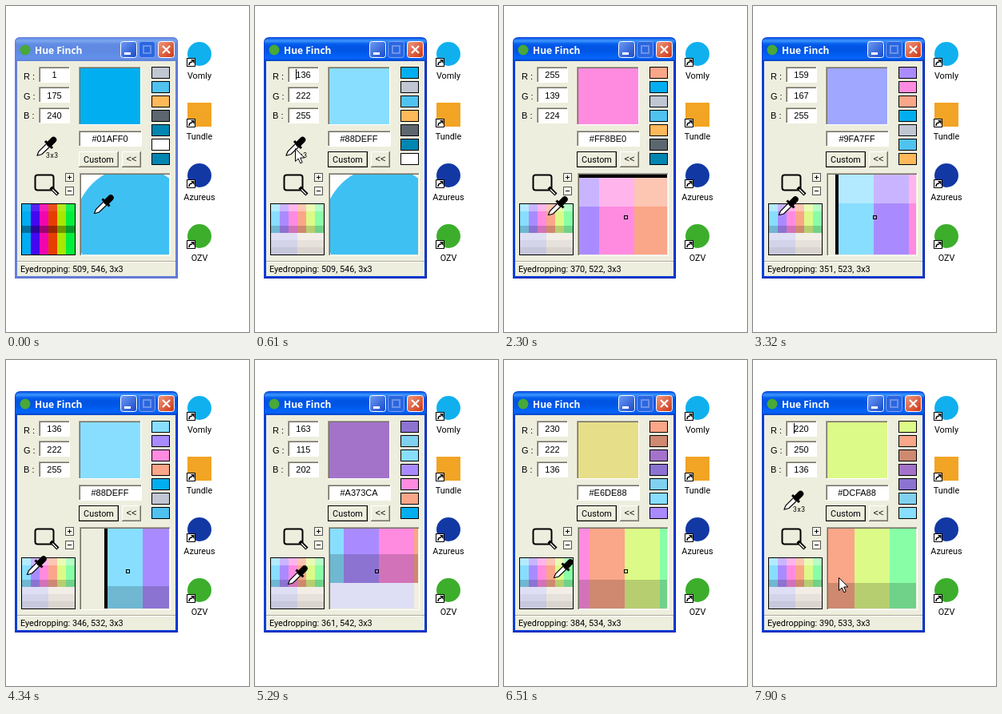
Animation of 304x408 px, one loop 7960 ms. Source, as an HTML page:

```html
<!DOCTYPE html>
<html lang="en">
<head>
<meta charset="utf-8">
<title>Colour picker</title>
<style>
html, body { margin: 0; width: 100%; height: 100%; overflow: hidden; background: #fff; }
svg { display: block; }
text { font: 10.85px Roboto, sans-serif; fill: #000; white-space: pre; }
.ctl { font: 11px "Liberation Sans", sans-serif; }
.mid { text-anchor: middle; }
.title { font: bold 12px "Open Sans", sans-serif; fill: #fff; }
.crisp { shape-rendering: crispEdges; }
</style>
</head>
<body>
<svg id="stage" width="304" height="408" viewBox="0 0 304 408"></svg>
<script>
const LOOP = 7960, CLICK = 250, DRAG = 810, DROP = 7090, STEP = 60;
const COL = 11, ROW = 9, LEFT = 20, TOP = 248;

const parse = s => [1, 3, 5].map(i => parseInt(s.substr(i, 2), 16));
const FACE = parse("#EEEEDE"), START = parse("#01AFF0"), BLACK = [0, 0, 0], WHITE = [255, 255, 255];
const PASTEL = "#88DEFF #AA8BFF #FF8BE0 #FAA688 #DCFA88 #88FEA6".split(" ").map(parse);
const VIVID = PASTEL.map(c => c.map(v => Math.round((v - 136) * 240 / 119)));
const OLD = "#c0c6d2 #50c2f0 #ffb95a #5c666e #0086b0 #ffffff #0086b0".split(" ");

// pointer moves: start, end, x, y; it rests in between
const MOVES = [
  [120, 610, 50, 178], [DRAG, 1480, 75, 257], [1610, 1970, 55, 261], [2300, 2360, 45, 259],
  [2600, 2800, 36, 261], [3200, 3570, 25, 261], [3900, 4080, 26, 268], [4340, 4530, 25, 274],
  [4790, 5030, 34, 280], [5230, 5290, 41, 280], [5550, 5800, 57, 280], [6060, 6180, 62, 272],
  [6510, 6760, 70, 271], [DROP, 7280, 117, 272], [7540, 7900, 107, 272]
];

const $ = id => document.getElementById(id);
const mix = (c, d, k) => c.map((v, i) => Math.round(v + (d[i] - v) * k));
const rgb = c => `rgb(${c})`;
const hex = c => "#" + c.map(v => v.toString(16).padStart(2, "0")).join("").toUpperCase();
const rect = (x, y, w, h, fill, more = "") => `<rect x="${x}" y="${y}" width="${w}" height="${h}" fill="${fill}" ${more}/>`;
const text = (x, y, s, cls = "", id = "") => `<text x="${x}" y="${y}" class="${cls}" id="${id}">${s}</text>`;
const path = (d, stroke, w = 1, fill = "none") => `<path d="${d}" stroke="${stroke}" stroke-width="${w}" fill="${fill}"/>`;

// the pointer glides; the readout follows in steps
const glide = (t, a, b) => (t - a) / (b - a);
const hop = (t, a, b) => (Math.floor((t - a) / STEP) + 1) / (Math.round((b - a) / STEP) + 1);

function pos(t, pace) {
  let at = [110, 259];
  for (const [a, b, x, y] of MOVES)
    if (t >= a) at = mix(at, [x, y], Math.min(1, pace(t, a, b)));
  return at;
}

function cell(c, r, vivid) {
  const base = (vivid ? VIVID : PASTEL)[c];
  if (r === 0) return mix(base, WHITE, vivid ? .1 : .363);
  if (r < 3) return base;
  if (r === 3) return mix(base, BLACK, vivid ? .35 : .175);
  return vivid ? base : mix(c < 3 ? [222, 222, 245] : [242, 238, 230], BLACK, (r - 4) * .05);
}

function pixel(x, y) {
  const c = Math.floor((x - LEFT) / COL), r = Math.floor((y - TOP) / ROW);
  return c >= 0 && c < 6 && r >= 0 && r < 7 ? cell(c, r, false) : FACE;
}

// average of the 3x3 pixels around a point
function sample([x, y]) {
  const sum = [0, 0, 0];
  for (let i = 0; i < 9; i++)
    pixel(x - 1 + i % 3, y - 1 + Math.floor(i / 3)).forEach((v, j) => sum[j] += v);
  return sum.map(v => Math.round(v / 9));
}

// a colour rested on joins the history when the pointer moves on
function history(t) {
  const list = [...OLD];
  if (t >= CLICK) list.unshift(rgb(START));
  for (let i = 2; i < MOVES.length; i++) {
    const [, end, x, y] = MOVES[i - 1], leave = MOVES[i][0];
    const color = rgb(sample([x, y]));
    if (leave <= Math.min(t, DROP) && leave - end > 150 && color !== list[0]) list.unshift(color);
  }
  return list.slice(0, OLD.length);
}

function palette(vivid) {
  let s = rect(LEFT - 1, TOP - 1, 6 * COL + 2, 7 * ROW + 2, "#000");
  for (let r = 0; r < 7; r++)
    for (let c = 0; c < 6; c++)
      s += rect(LEFT + c * COL, TOP + r * ROW, COL, ROW, rgb(cell(c, r, vivid)));
  return s;
}

const sunk = (x, y, w, h, fill, id = "") =>
  rect(x, y, w, h, "#fff") + rect(x, y, w - 1, h - 1, "#aca899") +
  rect(x + 1, y + 1, w - 2, h - 2, "#716f64") + rect(x + 2, y + 2, w - 3, h - 3, fill, `id="${id}"`);

const button = (x, y, w, h) =>
  rect(x, y, w, h, "#716f64") + rect(x, y, w - 1, h - 1, "#fff") +
  rect(x + 1, y + 1, w - 2, h - 2, "#aca899") + rect(x + 1, y + 1, w - 3, h - 3, rgb(FACE));

const caption = (x, fill, edge, glyph) =>
  rect(x + .5, 44.5, 20, 20, fill, `rx="3" stroke="${edge}"`) + glyph;

const dropper = id => `<g id="${id}">` +
  path("M0,0 L2,-5 L13,-16 L17,-12 L6,-1.5 L1,0Z", "#000", 1.2, "#fff") +
  path("M10,-18 L19,-9", "#000", 3) +
  `<path d="M15.5,-14.5 L20.5,-19.5" stroke="#000" stroke-width="7.5" stroke-linecap="round"/></g>`;

const disc = (y, fill) => `<circle cx="242" cy="${y + 15}" r="15" fill="${fill}"/>`;
const tile = (y, fill) => rect(227, y, 30, 30, fill);

const shortcut = ([label, shape, fill], i) => {
  const y = 45 + 76 * i;
  return shape(y, fill) + rect(226.5, y + 20.5, 10, 10, "#fff", 'stroke="#000"') +
    path(`M229,${y + 29} Q229,${y + 25} 233,${y + 25}`, "#000", 1.6) +
    path(`M231,${y + 22} H235.5 V${y + 27}Z`, "none", 0, "#000") +
    text(242, y + 46, label, "mid");
};

const gradient = (id, dir, ...colors) => `<linearGradient id="${id}" ${dir}>` +
  colors.map((c, i) => `<stop offset="${i / (colors.length - 1)}" stop-color="${c}"/>`).join("") + "</linearGradient>";

const FRAME = "M11,341 V46 Q11,39 18,39 H208 Q215,39 215,46 V341Z";

$("stage").innerHTML = "<defs>" +
gradient("bar", 'x2="0" y2="1"', "#0a5ce8", "#3d95ff", "#0560ee", "#0054e3", "#0054e3", "#0058ea", "#0060f4", "#0664fa", "#0043c0") +
gradient("blue", 'x2="1" y2="1"', "#6f9cf5", "#1648c8") +
gradient("red", 'x2="1" y2="1"', "#f09a80", "#cc3410") +
`<clipPath id="lens"><rect x="94" y="211" width="110" height="100"/></clipPath></defs>
<path d="${FRAME}" fill="#0a3fd6"/>
<path d="M12,69 V46 Q12,40 18,40 H208 Q214,40 214,46 V69Z" fill="url(#bar)"/>` +
path("M11,340.5 H214.5 V46", "#0019a8") +
`<path id="idle" d="${FRAME}" fill="#b0b4e0" opacity=".55"/>
<circle cx="24" cy="55" r="6.5" fill="#48a838"/>` +
text(36, 60, "Hue Finch", "title") +
caption(143, "url(#blue)", "#fff", rect(148, 58, 8, 3, "#fff")) +
caption(166, "#2a66e0", "#7ea4f2", rect(172, 50, 9, 9, "none", 'stroke="#6a92ea" stroke-width="2"')) +
caption(190, "url(#red)", "#fff", path("M196,50 L205,59 M205,50 L196,59", "#fff", 2.2)) +
`<g class="crisp">` +
rect(14, 69, 198, 269, rgb(FACE)) +
[76, 101, 127].map(y => sunk(41, y, 39, 20, "#fff")).join("") +
sunk(91, 76, 78, 73, "#fff", "swatch") + sunk(91, 156, 79, 20, "#fff") +
button(91, 182, 50, 20) + button(145, 182, 24, 20) +
rect(91.5, 182.5, 49, 19, "none", 'stroke="#000" id="focus"') +
OLD.map((c, i) => rect(182.5, 76.5 + i * 18, 22, 14, c, `stroke="#000" id="old${i}"`)).join("") +
[209, 226].map(y => rect(74.5, y + .5, 10, 10, "#f4f2e8", 'stroke="#555"')).join("") +
path("M77,214.5 H82 M79.5,212 V217 M77,231.5 H82", "#000") +
rect(14, 319, 198, 1, "#aca899") + rect(14, 320, 198, 1, "#fff") +
`<g id="pal"></g>` + sunk(92, 209, 114, 104, rgb(FACE)) +
`<g clip-path="url(#lens)"><g id="zoom"><use href="#pal"/></g></g>` +
rect(150.5, 262.5, 4, 4, "none", 'stroke="#000" id="mark"') + `</g>
<g id="start" clip-path="url(#lens)">` + rect(94, 211, 110, 100, "#fff") + `<circle cx="160" cy="275" r="74" fill="#3fc0f3"/></g>` +
["R", "G", "B"].map((c, i) =>
  text(22, 92 + i * 24.5, c + " :", "ctl") + text(60.5, 90 + i * 25.5, "", "ctl mid", "chan" + i)).join("") +
text(130, 170, "", "ctl mid", "hex") + text(116, 196, "Custom", "mid") + text(157, 195, "&lt;&lt;", "ctl mid") +
text(18, 333, "", "", "status") +
rect(51, 79, 1, 13, "#000", 'id="caret"') +
rect(36.5, 211.5, 23, 19, "none", 'rx="3" stroke="#000" stroke-width="2"') +
path("M56,227 L65,236", "#000", 4.5) + path("M58,229.5 L64,235.5", "#fff", 1.2) +
`<g id="home"><g transform="translate(39,187)">${dropper("")}</g>
<text x="50" y="190" style="font-size:8.5px" letter-spacing=".6">3x3</text></g>` +
[["Vomly", disc, "#10b0ee"], ["Tundle", tile, "#f2a424"], ["Azureus", disc, "#1238a4"], ["OZV", disc, "#3cae2c"]].map(shortcut).join("") +
dropper("pick") +
`<g id="arrow">${path("M.5,.5 V16.5 L4.2,13 L6.8,18.8 L9.2,17.8 L6.7,12 H11.8Z", "#000", 1, "#fff")}</g>`;

const show = (id, on) => $(id).style.display = on ? "" : "none";
const move = (id, x, y) => $(id).setAttribute("transform", `translate(${x},${y})`);

let wasVivid;
function draw(t) {
  const active = t >= CLICK, begun = t >= DRAG, dragging = begun && t < DROP;
  if (wasVivid !== !active) $("pal").innerHTML = palette(wasVivid = !active);

  const at = pos(Math.min(t, DROP - 1), hop);
  const color = begun ? sample(at) : active ? PASTEL[0] : START;
  const [sx, sy] = begun ? [at[0] + 320, at[1] + 262] : [509, 546];
  color.forEach((v, i) => $("chan" + i).textContent = v);
  $("hex").textContent = hex(color);
  $("swatch").setAttribute("fill", rgb(color));
  $("status").textContent = `Eyedropping: ${sx}, ${sy}, 3x3`;
  $("zoom").setAttribute("transform", `translate(151,263) scale(4) translate(${-at[0]},${-at[1]})`);
  history(t).forEach((c, i) => $("old" + i).setAttribute("fill", c));

  const picking = dragging || !active;
  show("idle", !active);
  show("focus", active);
  show("start", !begun);
  show("mark", dragging);
  show("home", !dragging);
  show("caret", active && Math.floor((t - 1410) / 530) % 2 === 0);
  show("pick", picking);
  show("arrow", !picking);

  const [px, py] = pos(t, glide);
  move("pick", px + .5, py + .5);
  move("arrow", px, py);
}

const begin = performance.now();
function tick() {
  draw((performance.now() - begin) % LOOP);
  requestAnimationFrame(tick);
}
tick();
</script>
</body>
</html>
```
